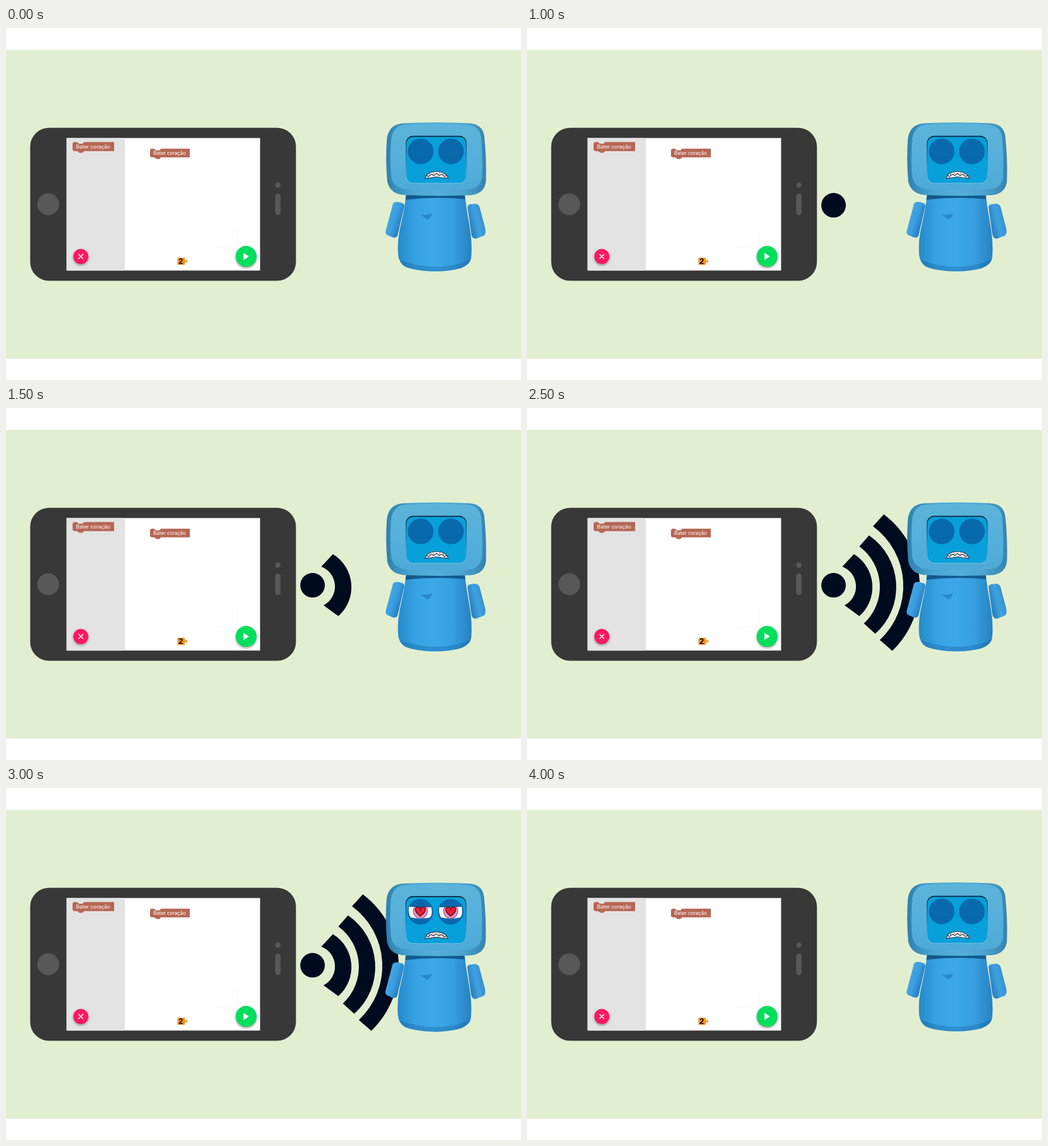
An HTML page with a canvas for the animation above (4500 ms loop, 905x619 px).

```html
<!DOCTYPE html>
<html lang="pt">
<head>
<meta charset="utf-8">
<title>Bater coração</title>
<style>
html, body { margin: 0; width: 100%; height: 100%; overflow: hidden; background: #fff; }
canvas { display: block; }
</style>
</head>
<body>
<canvas id="stage" width="905" height="619"></canvas>
<script>
const ctx = document.getElementById('stage').getContext('2d');
const STEP = 500, STEPS = 9;
const INK = '#383838', NAVY = '#010b1f';

function fill(path, color) {
  ctx.fillStyle = color;
  ctx.fill(path);
}

function shape(d, color) {
  const path = new Path2D(d);
  fill(path, color);
  return path;
}

function line(d, color, width) {
  ctx.strokeStyle = color;
  ctx.lineWidth = width;
  ctx.stroke(new Path2D(d));
}

function box(x, y, w, h, r, color) {
  const path = new Path2D();
  path.roundRect(x, y, w, h, r);
  fill(path, color);
}

function disc(x, y, r, color) {
  const path = new Path2D();
  path.arc(x, y, r, 0, Math.PI * 2);
  fill(path, color);
}

function blend(x0, y0, x1, y1, ...colors) {
  const g = ctx.createLinearGradient(x0, y0, x1, y1);
  colors.forEach((c, i) => g.addColorStop(i / (colors.length - 1), c));
  return g;
}

function withShadow(draw) {
  ctx.save();
  ctx.shadowColor = 'rgba(0,0,0,.4)';
  ctx.shadowBlur = 4;
  ctx.shadowOffsetY = 2;
  draw();
  ctx.restore();
}

function block(x, y, w, scale) {
  ctx.save();
  ctx.translate(x, y);
  ctx.scale(scale, scale);
  const r = w / scale;
  shape(`M0 4Q0 0 4 0H7.5L11 3H17L20.5 0H${r}V16H20.5L17 19H12L8 16H4Q0 16 0 12Z`, '#b66754');
  ctx.fillStyle = '#fff';
  ctx.font = '9.7px Roboto, sans-serif';
  ctx.textAlign = 'left';
  ctx.fillText('Bater coração', 6, 11.5);
  ctx.restore();
}

function phone() {
  box(42.5, 175.5, 467, 269, 33, INK);
  disc(74.2, 310, 19.2, '#585858');
  disc(477.8, 276.3, 4.8, '#585858');
  box(473, 291, 9.6, 38, 4.8, '#585858');
  box(106.5, 193.5, 340, 233, 0, '#fff');
  box(106.5, 193.5, 102.5, 233, [0, 5, 5, 0], '#e3e3e3');
  line('M368 385.5L393 384.5M407.5 353V382', '#f3f3f3', 1);

  block(117, 200.5, 73, 1);
  block(253, 212.3, 70, .955);

  withShadow(() => disc(131.5, 401.8, 13.2, '#ff1764'));
  line('M127.3 397.6L135.7 406M135.7 397.6L127.3 406', '#fff', 1.5);
  withShadow(() => disc(422, 401.7, 18.4, '#00de5c'));
  shape('M417.3 395.6L427 401.8L417.3 408Z', '#fff');

  box(301.3, 404, 13, 12.6, 1, '#f98f1d');
  shape('M314 409L317 407.3L319.5 410.2L317 413L314 411.5Z', '#f5a050');
  disc(302, 410, 1.7, '#d8b48c');
  ctx.fillStyle = '#111';
  ctx.font = 'bold 14px "Liberation Sans", Arial, sans-serif';
  ctx.textAlign = 'center';
  ctx.fillText('2', 307.2, 415);
}

function hand() {
  ctx.save();
  ctx.beginPath();
  ctx.rect(0, 0, 905, 581.5);
  ctx.clip();
  ctx.lineCap = ctx.lineJoin = 'round';

  const outline = 'M413.5 510V409Q414.5 398.5 425.5 398.5Q437 398.5 437.8 409V446'
    + 'Q442 443.5 455 443.5Q466 443.5 468.5 451Q472 447.5 483 447.5Q493 447.5 496.5 455'
    + 'Q499 450.5 507 450.5Q516.3 450.5 516.3 459V525Q516 537 507 543Q499 550 498.5 558'
    + 'V575H434V558Q423 552 414 540Q398 520 397.5 509Q397.5 491 404 483Q408 479 413 479';
  const skin = new Path2D(outline);
  fill(skin, '#ffeec1');
  ctx.save();
  ctx.clip(skin);
  shape('M413 478V512Q411 501 404 498L397 505V478Z', '#ffab8c');
  shape('M500 449Q509 452 508.5 461V525Q508 537 499 543Q491 549 490 558H519V449Z', '#ffab8c');
  box(430, 557, 73, 20, 0, '#ffab8c');
  ctx.restore();
  line(outline, INK, 5);
  line('M439 446V475M468.5 451V475M496.5 455V474', INK, 5);

  box(423, 575, 84, 12, 0, '#5fbdf5');
  box(498, 575, 9, 12, 0, '#3d9fe0');
  ctx.lineCap = 'butt';
  ctx.lineJoin = 'miter';
  line('M423 590V575H507V590', INK, 5);
  ctx.restore();
}

const waves = [
  'M574.5 257A68 68 0 0 1 584 366L558 347A37.3 37.3 0 0 0 554 279Z',
  'M601 224A110 110 0 0 1 612 397L592 379A88 88 0 0 0 584 243.5Z',
  'M627 187A158 158 0 0 1 642 427L620 408A130 130 0 0 0 608 208Z'
];

function signal(count) {
  disc(538.7, 311.7, 21.6, NAVY);
  waves.slice(0, count).forEach(d => shape(d, NAVY));
}

function heart(x, y, size) {
  ctx.save();
  ctx.translate(x, y);
  ctx.scale(size, size);
  const d = 'M0 8.5C-5 4 -9 1 -9 -3.5C-9 -8.5 -2.5 -9.5 0 -5C2.5 -9.5 9 -8.5 9 -3.5C9 1 5 4 0 8.5Z';
  shape(d, '#f21b36');
  line(d, '#33101f', 1.3);
  line('M0 -4V0', '#33101f', 1);
  ctx.restore();
}

function eye(x, side, beat) {
  const y = 217;
  disc(x, y, 22.6, '#0869ad');
  if (!beat) {
    line(`M${x - 20} ${y + 7}Q${x} ${y + 17} ${x + 20} ${y + 7}`, '#0a60a2', 1);
    return;
  }
  ctx.save();
  const ball = new Path2D(`M${x - 20} ${y - 9 - side}L${x + 19} ${y - 9 + side}`
    + `Q${x + 22} ${y + 4} ${x + 17} ${y + 10}Q${x} ${y + 14} ${x - 17} ${y + 10}Q${x - 22} ${y + 3} ${x - 20} ${y - 9 - side}Z`);
  fill(ball, '#fff');
  ctx.clip(ball);
  disc(x, y - 1, 13.2, '#a8589b');
  disc(x, y - 1, 11.8, '#ec91bd');
  ctx.restore();
  heart(x, y - .5, beat);
  line(`M${x - 20} ${y - 9 - side}L${x + 19} ${y - 9 + side}`, '#174a8c', 1.5);
}

function mouth() {
  const d = 'M736.5 264.5Q740 252.5 756.5 252.5Q773 252.5 777 264.5Q772 263 767 263.5Q757 260 746 263.5Q741 263 736.5 264.5Z';
  shape(d, '#fff');
  line('M738 259.5L743 261L747 257L752 259.5L756.5 255.5L761 259.5L766 257L770 261L775.5 259.5', '#343746', 1.4);
  line('M744 255.5V260M751 253V258M762 253V258M769 255.5V260', '#555b69', .8);
  line(d, '#343746', 1.2);
}

function robot(beat) {
  ctx.save();
  if (beat) ctx.translate(-.5, .6);

  // arms
  shape('M680 309Q683 305 690 306L698 308.5Q701 311 699.5 316L688 365Q686 370 679 368L670 364Q666 361 667.5 356Z',
    blend(668, 330, 699, 340, '#48aae5', '#3a9ee0', '#2375b8'));
  shape('M811 315Q811 311 816 310L824 309Q829 309 832 314L842 352Q844 362 840 365L826 370.5Q820 371 818 364Z',
    blend(810, 340, 843, 332, '#2478b8', '#3fa2e0', '#3488c4'));

  // body
  const torso = 'M703 292H806Q809 318 814 345Q820 378 817.5 404Q815 417 797 423Q775 428.5 752 428'
    + 'Q720 427 702 420Q690 413 689 398Q687 372 695 340Q701 315 703 292Z';
  shape(torso, blend(689, 0, 818, 0, '#268aca', '#37a3e5', '#3ca8e9', '#369fdf', '#2782c2'));
  shape('M692 408Q725 420 756 420Q795 419 817 406Q815 417 797 423Q775 428.5 752 428Q720 427 702 420Q694 416 692 408Z',
    'rgba(20,90,150,.32)');
  shape('M703 294H806L807 301Q755 296 702 302Z', '#125a8e');
  shape('M728 328Q737 330 749 326Q746 335 740 337Q736 333 728 328Z', 'rgba(22,100,160,.45)');

  // head
  const head = 'M698 167.5Q757 164.5 814 167.5Q838 169 840.5 191Q844.5 228 843.5 268Q842 291 817 294'
    + 'Q758 296.5 697 293.5Q675 291 670 270Q666.5 230 669.5 193Q674 169 698 167.5Z';
  shape(head, blend(668, 0, 844, 0, '#2d80af', '#4aa5d1', '#54afd9', '#4ca5d0', '#3583af'));
  shape('M701 170Q757 167 811 170Q832 172 835 192Q838 228 836.5 262Q834 282 812 284'
    + 'Q757 287 701 283Q681 281 677 262Q674 228 677 194Q681 172 701 170Z',
    blend(0, 168, 0, 287, '#5db3d9', '#55b0dc', '#4da9d7'));

  // face
  box(702.5, 189.5, 107, 84, 13, blend(0, 189, 0, 273, '#102c3d', '#23729a', '#79c4e4'));
  box(703.8, 191.5, 104.6, 81, 12, '#07a0da');
  eye(728.7, .5, beat);
  eye(782, -.5, beat);
  mouth();
  ctx.restore();
}

function draw(step) {
  ctx.fillStyle = '#fff';
  ctx.fillRect(0, 0, 905, 619);
  ctx.fillStyle = '#e2eed0';
  ctx.fillRect(0, 38.5, 905, 543);
  phone();
  if (step === 1) hand();
  if (step > 1 && step < 8) signal(Math.min(step - 2, 3));
  robot(step === 6 ? 1 : step === 7 ? .8 : 0);
}

const start = performance.now();
function tick() {
  draw(Math.floor((performance.now() - start) / STEP) % STEPS);
  requestAnimationFrame(tick);
}
tick();
</script>
</body>
</html>
```
